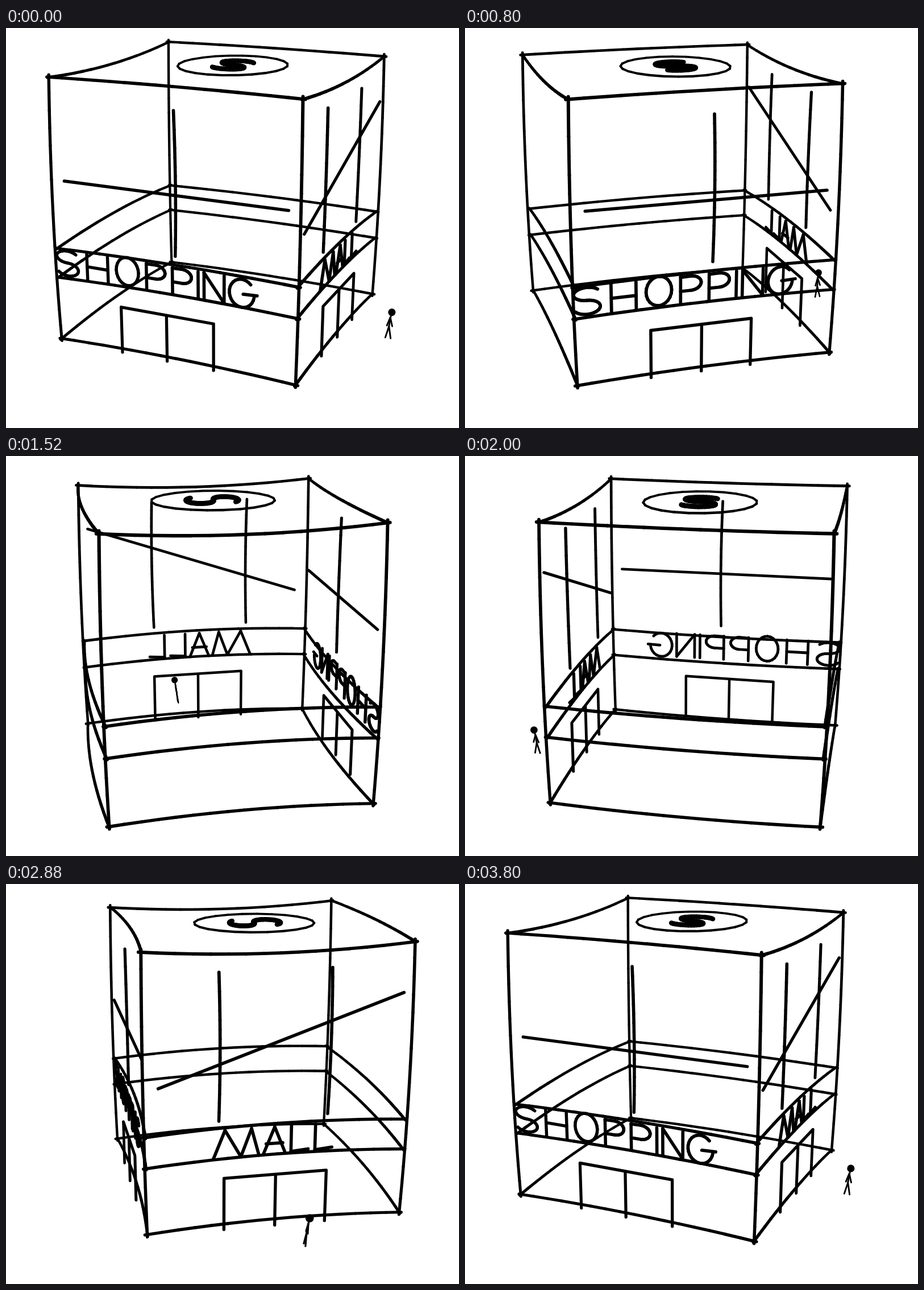
These frames come from a looping animation (797x703 px, 3.84 s). An HTML page with a canvas:

```html
<!DOCTYPE html>
<html>
<head>
<meta charset="utf-8">
<style>
  html, body { margin: 0; height: 100%; overflow: hidden; background: #fff; }
  canvas { display: block; }
</style>
</head>
<body>
<canvas id="stage" width="797" height="703"></canvas>
<script>
const ctx = document.getElementById('stage').getContext('2d');
const LOOP = 3840, STEP = 40, TURN = 3816;
const INK = 5.2, FLOOR = 482, SIGN = 307, SIGN_END = 362;

// Points are [u, v, g]: two floor axes around the turning axis, and depth below the roof.
const corner = (su, sv) => [-31 + su * 228, -34 + sv * 224];
const CORNERS = [corner(-1, 1), corner(-1, -1), corner(1, -1), corner(1, 1)];
const mix = (a, b, t) => a + (b - a) * t;
let cos = 1, sin = 0;

function project([u, v, g]) {
  const x = 31 + cos * u - sin * v;
  const z = 9 + sin * u + cos * v;
  const s = 1 / (1 - 5.1e-4 * z + 1.68e-4 * g);
  return [370 + s * x, -262 + s * (335 + 1.0526 * g), s];
}

function line(points, width = INK) {
  const p = points.map(project);
  for (let i = 1; i < p.length; i++) {
    const [x0, y0, s0] = p[i - 1], [x1, y1, s1] = p[i];
    ctx.lineWidth = width * (s0 + s1) / 2;
    ctx.beginPath();
    ctx.moveTo(x0, y0);
    ctx.lineTo(x1, y1);
    ctx.stroke();
  }
}

// Samples pointAt(t, bulge) for t in 0..1, where bulge peaks at 1 in the middle
const sample = (pointAt, n = 16) =>
  Array.from({ length: n + 1 }, (_, i) => pointAt(i / n, 4 * i / n * (1 - i / n)));

const arc = (x, y, rx, ry, from, to) => sample(t => {
  const a = mix(from, to, t) * Math.PI / 180;
  return [x + rx * Math.cos(a), y + ry * Math.sin(a)];
}, 24);

// Letters as strokes in a unit box, y down
const stem = x => [[x, 0], [x, 1]];
const GLYPHS = {
  S: { width: 44, strokes: [[...arc(0.5, 0.25, 0.5, 0.23, -35, -270), ...arc(0.5, 0.73, 0.5, 0.25, -90, 150)]] },
  H: { width: 42, strokes: [stem(0), stem(1), [[0, 0.5], [1, 0.5]]] },
  O: { width: 44, strokes: [arc(0.5, 0.43, 0.5, 0.53, 0, 360)] },
  P: { width: 36, strokes: [stem(0), [[0, 0.02], ...arc(0.5, 0.27, 0.5, 0.26, -90, 90), [0, 0.53]]] },
  I: { width: 0, strokes: [stem(0)] },
  N: { width: 37, strokes: [[[0, 1], [0, 0], [1, 1], [1, 0]]] },
  G: { width: 50, strokes: [arc(0.45, 0.53, 0.45, 0.51, -45, -350), [[0.5, 0.55], [1, 0.53]]] },
  M: { width: 78, strokes: [[[0, 1], [0.25, 0], [0.6, 1], [0.83, 0], [1, 1]]] },
  A: { width: 39, strokes: [[[0, 1], [0.5, 0], [1, 1]], [[0.13, 0.6], [0.87, 0.6]]] },
  L: { width: 30, strokes: [[[0, 0], [0, 0.95], [1, 0.9]]] },
};

// Pen for a wall: draws points given as [distance along, depth]
const wallPen = (p, q) => (points, width) => {
  const length = Math.hypot(q[0] - p[0], q[1] - p[1]);
  line(points.map(([a, g]) => [mix(p[0], q[0], a / length), mix(p[1], q[1], a / length), g]), width);
};
const front = wallPen(CORNERS[0], CORNERS[3]);
const side = wallPen(CORNERS[3], CORNERS[2]);

function write(pen, text, x, top, gap, gapStep) {
  for (const letter of text) {
    const { width, strokes } = GLYPHS[letter];
    for (const s of strokes) pen(s.map(([a, b]) => [x + a * width, top + b * 49]), 5.4);
    x += width + gap;
    gap += gapStep;
  }
}

function door(pen, left, top) {
  const right = left + 179;
  pen([[left, top], [right, top]]);
  for (const x of [left, (left + right) / 2, right]) pen([[x, top + 2], [x, FLOOR + 3]]);
}

const bar = (pen, x) => pen(sample((t, k) => [x + 2 * k, mix(37, 287, t)]));

// Hand-drawn box: edges bend a little and overshoot the corners
function drawBox() {
  CORNERS.forEach((p, i) => {
    const q = CORNERS[(i + 1) % 4], across = i % 2;
    for (const g of [0, SIGN, SIGN_END, FLOOR]) {
      const sag = across ? 0 : g ? -9 : 10, bend = across ? -10 : 0;
      line(sample((t, k) => {
        const reach = mix(-0.009, 1.009, t);
        return [mix(p[0], q[0], reach), mix(p[1], q[1], reach) + bend * k, g + sag * k];
      }));
    }
    line(sample((t, k) => [p[0] * (1 + 0.014 * k), p[1] * (1 + 0.014 * k), mix(-4, FLOOR + 4, t)]));
  });
}

function drawWalls() {
  bar(front, 235);
  front([[21, 180], [437, 180]]);
  door(front, 127, 398);
  write(front, 'SHOPPING', -2, SIGN + 1, 18.5, -1.5);

  bar(side, 123);
  bar(side, 310);
  side([[23, 224], [434, 84]]);
  door(side, 132, 390);
  write(side, 'MALL', 114, SIGN - 3, 7, 2.5);
}

function drawRoof() {
  line(arc(-20, -41, 97, 107, 0, 360).map(([u, v]) => [u, v, -2]), 4);
  line(GLYPHS.S.strokes[0].map(([x, y]) => [10 - 60 * x, 5 - 95 * y, -2]), 8.5);
}

function drawPerson() {
  const place = (x, up) => [285 + x, -60 - 0.13 * up, FLOOR - up];
  const limb = (x0, up0, x1, up1) => line([place(x0, up0), place(x1, up1)], 3);
  limb(2, 44, 0, 22);
  for (const way of [-1, 1]) {
    limb(0, 22, 5 * way, 0);
    limb(1, 39, 1 + 5 * way, 23);
  }
  const [x, y, s] = project(place(3, 49));
  ctx.beginPath();
  ctx.arc(x, y, 6.8 * s, 0, 2 * Math.PI);
  ctx.fill();
}

function draw() {
  const time = Math.floor(performance.now() % LOOP / STEP) * STEP;
  const u = time / TURN;
  const eased = mix((1 - Math.cos(Math.PI * u)) / 2, u, 0.09);
  const angle = (24.4 - 360 * eased) * Math.PI / 180;
  cos = Math.cos(angle);
  sin = Math.sin(angle);

  ctx.clearRect(0, 0, 797, 703);
  ctx.lineCap = 'round';
  drawBox();
  drawWalls();
  drawRoof();
  drawPerson();
  requestAnimationFrame(draw);
}
draw();
</script>
</body>
</html>
```
